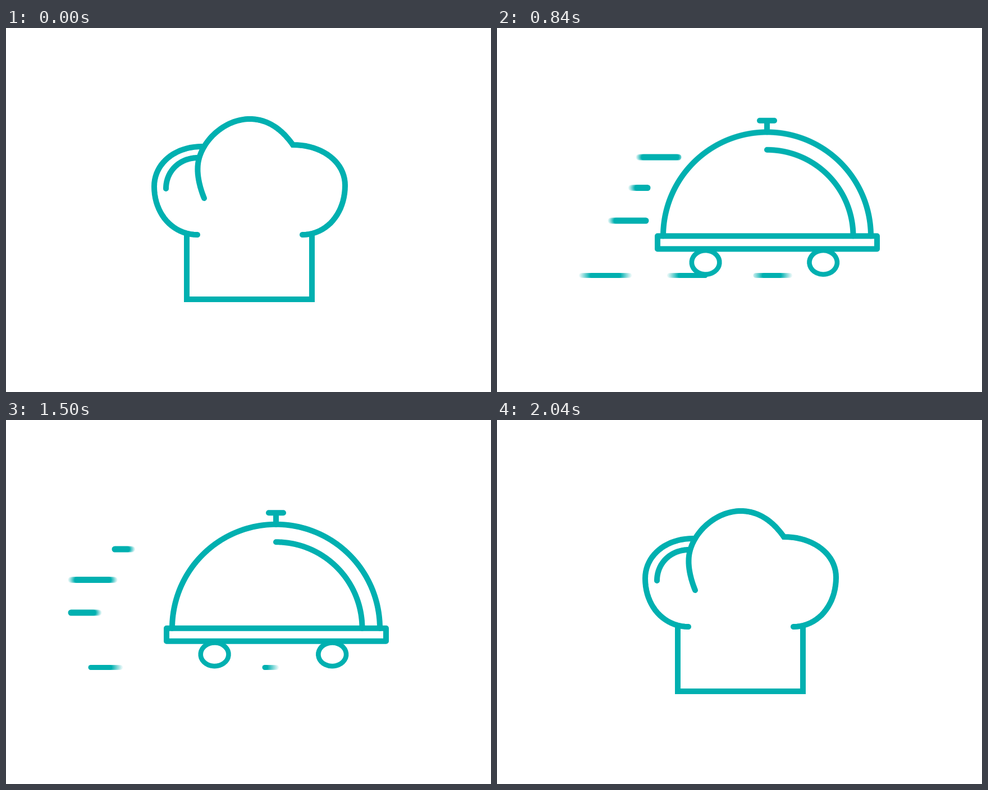
An HTML page with a canvas for the animation above (2.25 s loop, 864 px wide and 648 px high).

```html
<!DOCTYPE html>
<html lang="en">
<head>
<meta charset="utf-8">
<title>Chef hat to serving cart</title>
<style>
html, body { margin: 0; width: 100%; height: 100%; overflow: hidden; background: #fff; }
canvas { display: block; }
</style>
</head>
<body>
<canvas id="stage" width="864" height="648"></canvas>
<script>
const W = 864, H = 648, LOOP = 2250, STEP = 30;
const INK = '#00abae';
const SAMPLES = 8, SHUTTER = 21;
const MORPH_IN = 315, MORPH_OUT = 2040, MORPH_TIME = 400;
const MID = 0.571;

const makeLayer = () => {
  const c = document.createElement('canvas');
  c.width = W;
  c.height = H;
  return c.getContext('2d');
};
const screen = document.getElementById('stage').getContext('2d');
const g = makeLayer(), sum = makeLayer();

const clamp = x => Math.max(0, Math.min(1, x));
const mix = (a, b, k) => a + (b - a) * k;
const mixPoint = (p, q, k) => [mix(p[0], q[0], k), mix(p[1], q[1], k)];
const rad = deg => deg * Math.PI / 180;
const ease = x => x < 0.5 ? 4 * x ** 3 : 1 - 4 * (1 - x) ** 3;

// Every curve is a function from 0..1 to a point.
const arc = (cx, cy, r, from, to) => s => {
  const a = rad(mix(from, to, s));
  return [cx + r * Math.cos(a), cy + r * Math.sin(a)];
};

const cubic = (...p) => t => {
  const n = 1 - t;
  const at = i => n ** 3 * p[i] + 3 * n * n * t * p[i + 2] +
    3 * n * t * t * p[i + 4] + t ** 3 * p[i + 6];
  return [at(0), at(1)];
};

// Rounded corner between a level end and an upright end
function bend(x1, y1, x2, y2, levelFirst) {
  const k = 0.57;
  return levelFirst
    ? cubic(x1, y1, mix(x1, x2, k), y1, x2, mix(y2, y1, k), x2, y2)
    : cubic(x1, y1, x1, mix(y1, y2, k), mix(x2, x1, k), y2, x2, y2);
}

const chain = (...parts) => s => {
  const i = Math.min(Math.floor(s * parts.length + 1e-9), parts.length - 1);
  return parts[i](s * parts.length - i);
};

const hatBody = chain(
  bend(341, 368, 264, 282, true),
  bend(264, 282, 349, 211, false),
  cubic(349, 211, 395, 203, 450, 203, 511, 208),
  bend(511, 208, 604, 280, true),
  bend(604, 280, 528, 368, false)
);
const crown = chain(
  cubic(353, 303, 344, 281, 341, 262, 341.5, 249),
  cubic(341.5, 249, 342, 207, 386, 162, 434, 162),
  cubic(434, 162, 467, 162, 492, 181, 511, 208)
);
const shine = bend(285, 286, 342, 231, false);
const bow = cubic(385, 218, 455, 205, 530, 210, 580, 249);
const dome = arc(481, 368, 185, -180, 0);
const gleam = arc(481, 368, 153.5, -90, 0);

const streakLen = 66, streakTime = 393, streakGap = 451;
const streaks = [
  { y: 230, left: 194, right: 323, start: 708 },
  { y: 284.5, left: 102, right: 268, start: 801 },
  { y: 343, left: 116, right: 265, start: 736 }
];

// Ground dashes ride a belt that runs left at 1 px per ms.
const roads = [
  { left: 151, right: 371, start: 1000, gap: 157, len: 66 },
  { left: 461, right: 577, start: 1307, gap: 155, len: 45 }
];

function trace(curve, from, to) {
  const n = Math.ceil(Math.abs(to - from) * 100);
  for (let i = 0; i <= n; i++) g.lineTo(...curve(mix(from, to, i / n)));
}

function strokeCurve(curve, from = 0, to = 1) {
  if (from === to) return;
  g.beginPath();
  trace(curve, from, to);
  g.stroke();
}

function line(x1, y1, x2, y2) {
  g.beginPath();
  g.moveTo(x1, y1);
  g.lineTo(x2, y2);
  g.stroke();
}

function pen(width, cap, join = 'miter') {
  g.lineWidth = width;
  g.lineCap = cap;
  g.lineJoin = join;
}

function morphAt(t) {
  const u = ease(clamp(Math.min(t - MORPH_IN, MORPH_OUT - t) / MORPH_TIME));
  return u < 0.002 ? 0 : u > 0.999 ? 1 : u;
}

const bounceAt = t =>
  t < 620 || t > 1580 ? 0 : (1 - Math.cos((t - 620) / 160 * 2 * Math.PI)) / 2;

function drawTop(u) {
  const early = clamp(u / MID), late = clamp((u - MID) / (1 - MID)) ** 2;
  // The right end trails the left one.
  const body = s => mixPoint(hatBody(s), dome(s), u - 0.4 * s * u * (1 - u));
  const front = s => mixPoint(mixPoint(crown(s), bow(s), early), gleam(s), late);
  const bridge = clamp(u / 0.35);
  pen(10, 'round');
  strokeCurve(body, 0, 0.4 + bridge * 0.1);
  g.beginPath();
  trace(front, 0, 1);
  if (bridge > 0) {
    g.stroke();
    g.beginPath();
  }
  trace(body, 0.6 - bridge * 0.1, 1);
  g.stroke();
  strokeCurve(shine, bridge, 1);
}

function drawBase(u) {
  const x1 = mix(322, 286, u), x2 = mix(545, 677, u), y = mix(483, 391, u);
  pen(10, 'butt', u === 1 ? 'round' : 'miter');
  g.beginPath();
  if (u === 1) g.rect(x1, 368, x2 - x1, y - 368);
  else {
    g.moveTo(x1, 364);
    g.lineTo(x1, y);
    g.lineTo(x2, y);
    g.lineTo(x2, 364);
  }
  g.stroke();
  if (u > 0 && u < 1) line(x2, 368, mix(x2, x1, u ** 0.6), 368);
}

function drawHandle(u) {
  if (u === 0) return;
  g.save();
  g.beginPath();
  g.rect(462, 150, 38 * u, 40);
  g.clip();
  pen(10, 'round');
  line(468, 162.5, 494, 162.5);
  pen(10, 'butt');
  line(481, 166, 481, 178.5);
  g.restore();
}

function wheel(x, b, from, sweep) {
  if (sweep <= 0) return;
  g.beginPath();
  g.ellipse(x, 417.3, 24 + 0.9 * b, 24 - 3.2 * b, 0, rad(from), rad(from + sweep));
  g.stroke();
}

function drawWheels(u, b) {
  const v = clamp((u - 0.4) / 0.6);
  const first = 360 * v ** 1.4, second = 360 * v ** 8;
  pen(8.6, 'butt');
  wheel(371.6, b, 5 - first, first);
  wheel(581.2, b, -80 + 64 * v ** 3, Math.max(second, Math.min(13, 60 * v)));
}

function drawDash(a, b, { left, right }, y) {
  a = Math.max(a, left);
  b = Math.min(b, right);
  if (a < b) line(a, y, b, y);
}

function drawSpeed(t) {
  pen(11, 'round');
  for (const s of streaks) {
    const speed = (s.right - s.left + streakLen) / streakTime;
    for (let i = 0; i < 2; i++) {
      const head = s.right - (t - s.start - i * streakGap) * speed;
      drawDash(head, head + streakLen, s, s.y);
    }
  }
  pen(9, 'round');
  for (const r of roads) {
    for (let i = 0; i < 5; i++) {
      const head = r.start + i * r.gap - t;
      drawDash(head, head + r.len + 5.5 * i * i * (4 - i), r, 440.5);
    }
  }
}

function drawMoment(t) {
  const u = morphAt(t), b = bounceAt(t);
  g.clearRect(0, 0, W, H);
  g.strokeStyle = INK;
  g.save();
  g.translate(0, 2.8 * b);
  drawTop(u);
  drawBase(u);
  drawHandle(u);
  g.restore();
  drawWheels(u, b);
  drawSpeed(t);
}

// Averages a few moments around t to give motion blur.
function render(t) {
  const still = t < 330 || t >= MORPH_OUT;
  sum.globalCompositeOperation = 'lighter';
  sum.clearRect(0, 0, W, H);
  sum.globalAlpha = 1 / SAMPLES;
  for (let i = 0; i < SAMPLES; i++) {
    drawMoment(still ? 0 : t + ((i + 0.5) / SAMPLES - 0.5) * SHUTTER);
    sum.drawImage(g.canvas, 0, 0);
  }
  screen.fillStyle = '#fff';
  screen.fillRect(0, 0, W, H);
  screen.drawImage(sum.canvas, 0, 0);
}

const began = performance.now();
let shown = -1;
function tick() {
  const ms = (performance.now() - began) % LOOP;
  const t = Math.floor(ms / STEP) * STEP;
  if (t !== shown) render(shown = t);
  requestAnimationFrame(tick);
}
tick();
</script>
</body>
</html>
```
